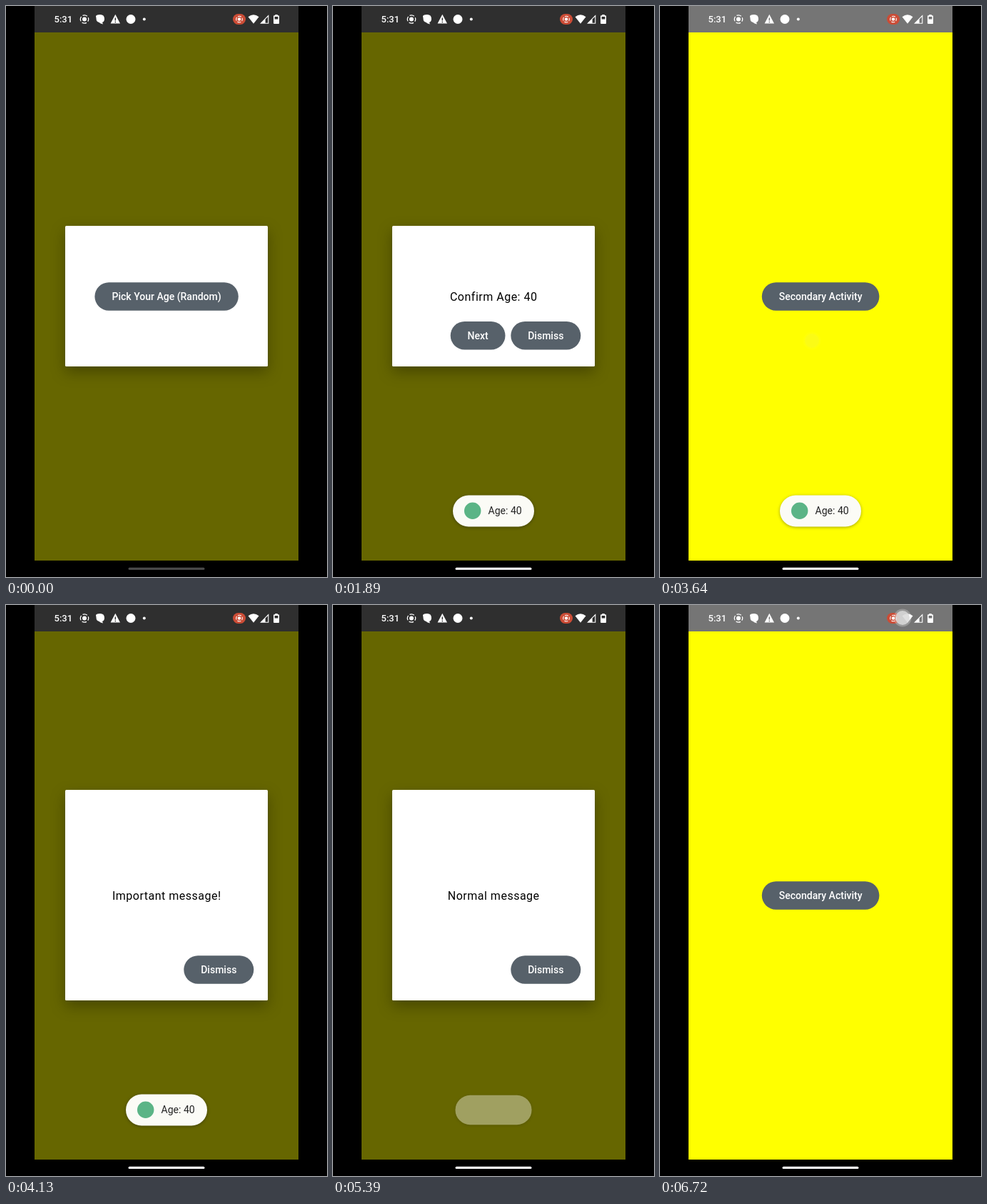
Write an HTML page that moves like this. It is 450x800 px and loops after 6790 ms.

```html
<!DOCTYPE html>
<html lang="en">
<head>
<meta charset="utf-8">
<title>Dialog chain</title>
<style>
  html, body { margin: 0; width: 100%; height: 100%; overflow: hidden; background: #000; }
  svg { display: block; width: 450px; height: 800px; font-family: Roboto, sans-serif; }
  .card { filter: drop-shadow(0 8px 10px rgba(0, 0, 0, .3)); }
  .label { font-size: 14px; font-weight: 500; fill: #fff; text-anchor: middle; }
  .body { font-size: 16px; letter-spacing: .5px; text-anchor: middle; }
  .toast { filter: drop-shadow(0 1px 2px rgba(0, 0, 0, .35)); }
</style>
</head>
<body>
<svg viewBox="0 0 450 800">
  <rect width="450" height="800"/>
  <rect x="40" y="37" width="370" height="740" fill="#ff0"/>
  <rect x="40" width="370" height="37" fill="#757575"/>
  <g id="screen"></g>
  <rect id="dim" x="40" width="370" height="777"/>
  <g id="dialogs"></g>

  <g id="toast">
    <rect class="toast" x="168" y="685.5" width="114" height="44" rx="22" fill="#fbfbf6"/>
    <g id="toastContent">
      <circle cx="195.7" cy="707.3" r="11.7" fill="#5bb486"/>
      <text x="217.6" y="712.2" font-size="14" fill="#222">Age: 40</text>
    </g>
  </g>

  <g fill="#fff">
    <text x="67.5" y="23" font-size="13" font-weight="500">5:31</text>
    <circle cx="110" cy="18.5" r="5.7" fill="none" stroke="#fff" stroke-width="1.3" stroke-dasharray="6.7 2.25" stroke-dashoffset="3.3"/>
    <circle cx="110" cy="18.5" r="3"/>
    <path d="M126 14q1-2 6-2q6 0 6 6q0 4-3 5l1 2.5q-4-1-5.500-2.500q-4-1-4-5.500z"/>
    <path fill-rule="evenodd" d="M153.300 11.800L160 24.500H146.600zM152.600 16.500v4h1.400v-4zm0 5.200v1.500h1.400v-1.500z"/>
    <circle cx="175" cy="18.500" r="6.500"/>
    <circle cx="193.800" cy="18.500" r="2"/>
    <rect x="318" y="11" width="18" height="15" rx="7.500" fill="#cb4c36"/>
    <circle cx="327" cy="18.500" r="4.300" fill="none" stroke="#fff" stroke-width="1.100" stroke-dasharray="5 1.750" stroke-dashoffset="2.500"/>
    <circle cx="327" cy="18.500" r="2.200"/>
    <path d="M339.500 15.300q7.500-6 15 0L347 24.800z"/>
    <path fill-rule="evenodd" d="M368.300 12.300V24.800H356zM367.200 15v8.700h-3.600v-5.100z"/>
    <path fill-rule="evenodd" d="M377.300 12h3.400v1.300h1.300q1 0 1 1V24q0 1-1 1h-6q-1 0-1-1V14.300q0-1 1-1h1.300zM376.600 15v3.500h4.800V15z"/>
  </g>
  <rect id="home" x="171.500" y="786.700" width="107" height="3.400" rx="1.700"/>
  <g id="touch">
    <circle r="12.500" fill="#fff" opacity=".25"/>
    <circle r="10" fill="#d9d9d9" opacity=".85"/>
  </g>
</svg>
<script>
const LOOP = 6790;
const el = id => document.getElementById(id);
const clamp = v => Math.max(0, Math.min(1, v));
const ramp = (t, start, span) => clamp((t - start) / span);

const button = (x, y, width, label) =>
  `<rect x="${x}" y="${y}" width="${width}" height="39.5" rx="19.75" fill="#57616a"/>
   <text class="label" x="${x + width / 2}" y="${y + 24.9}">${label}</text>`;
const message = text => `<text class="body" x="225.2" y="413.2">${text}</text>`;
const dismiss = y => button(249.3, y, 98, 'Dismiss');

const dialogs = [
  { open: -1000, close: 1555, top: 308, height: 197,
    content: button(124.4, 387.3, 201.4, 'Pick Your Age (Random)') },
  { open: 1635, close: 3490, top: 308, height: 197,
    content: message('Confirm Age: 40') + button(164.7, 442, 76.8, 'Next') + dismiss(442) },
  { open: 3650, close: 4938, top: 259, height: 295,
    content: message('Important message!') + dismiss(491.2) },
  { open: 5020, close: 6430, top: 259, height: 295,
    content: message('Normal message') + dismiss(491.2) }
];

// x, y, finger down, finger up
const touches = [
  [282, 408, 1470, 1555],
  [213, 469, 2830, 3490],
  [310, 519, 4850, 4938],
  [313, 517, 6330, 6430],
  [340, 18, 6650, LOOP]
];

el('screen').innerHTML = button(142.8, 387.3, 164.6, 'Secondary Activity');
el('dialogs').innerHTML = dialogs.map(d =>
  `<g><rect class="card" x="83" y="${d.top}" width="284" height="${d.height}" rx="1.5" fill="#fff"/>${d.content}</g>`
).join('');

function drawDialogs(t) {
  let light = 1;
  dialogs.forEach((d, i) => {
    const enter = ramp(t, d.open, 200);
    const exit = ramp(t, d.close, 150);
    const rest = (1 - enter) ** 2;
    const node = el('dialogs').children[i];
    node.setAttribute('opacity', enter * (1 - exit));
    node.setAttribute('transform', `translate(0 ${22 * rest - 9 * exit})`);
    light *= 1 - .6 * (1 - rest) * (1 - exit) ** 1.25;
  });
  el('dim').setAttribute('opacity', 1 - light);
}

function drawToast(t) {
  const shown = ramp(t, 1540, 140) * (1 - ramp(t, 5300, 150));
  const scale = .9 + .1 * shown;
  el('toast').setAttribute('opacity', shown);
  el('toast').setAttribute('transform', `translate(225 707.5) scale(${scale}) translate(-225 -707.5)`);
  el('toastContent').setAttribute('opacity', clamp(2 * shown - 1));
}

function drawTouch(t) {
  const hit = touches.find(([, , down, up]) => t >= down && t < up + 170);
  el('touch').setAttribute('opacity', hit ? 1 - ramp(t, hit[3], 170) : 0);
  if (hit) el('touch').setAttribute('transform', `translate(${hit[0]} ${hit[1]})`);
}

function draw(now) {
  const t = now % LOOP;
  drawDialogs(t);
  drawToast(t);
  drawTouch(t);
  const grey = 73 + 170 * ramp(t, 70, 250);
  el('home').setAttribute('fill', `rgb(${grey},${grey},${grey})`);
}

const start = performance.now();
function tick() {
  draw(performance.now() - start);
  requestAnimationFrame(tick);
}
tick();
</script>
</body>
</html>
```
